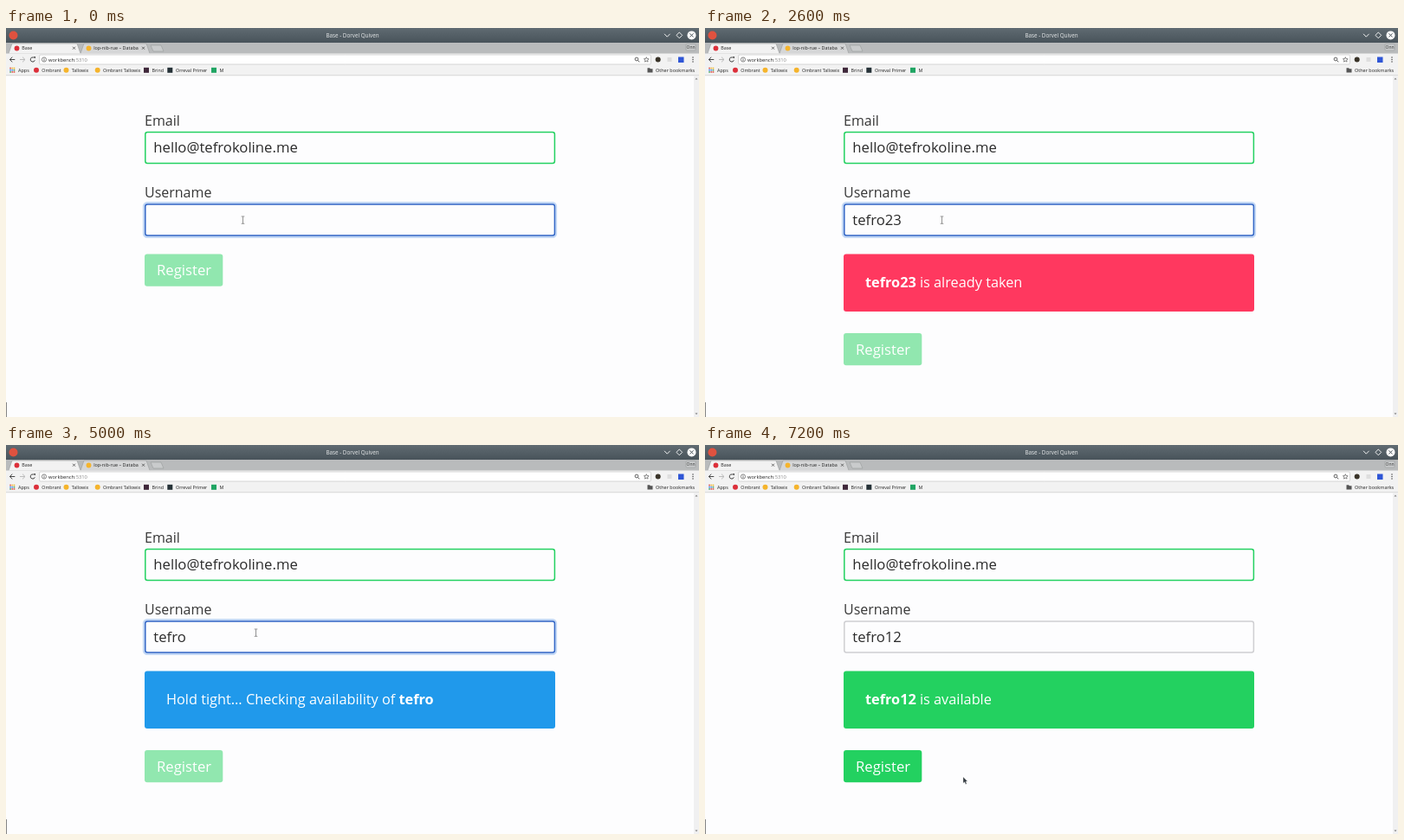
An HTML page with a canvas for the animation above (7.4 s loop, 800x450 px).

```html
<!DOCTYPE html>
<html lang="en">
<head>
<meta charset="utf-8">
<title>Registration form</title>
<style>
html, body { margin: 0; width: 100%; height: 100%; overflow: hidden; background: #fdfdfe; }
canvas { display: block; width: 800px; height: 450px; }
</style>
</head>
<body>
<canvas id="stage" width="800" height="450"></canvas>
<script>
const ctx = document.getElementById('stage').getContext('2d');
const LOOP = 7400, STEP = 200;
const SANS = '"Open Sans", "Noto Sans", sans-serif';
const GREEN = '#23d160', BLUE = '#2099eb', RED = '#ff385f';
const USER = 'tefro';

// [time, typed value]
const typing = [
  [0, ''], [800, 't'], [1000, 'te'], [1200, 'tef'], [1400, 'tefr'], [1600, USER],
  [1800, USER + '2'], [2000, USER + '23'], [4200, USER],
  [5200, USER + '1'], [5400, USER + '12']
];
const notices = [[0, ''], [800, 'checking'], [2600, 'taken'], [4200, 'checking'], [6000, 'available']];
// [time, x, y]
const pointerPath = [
  [0, 273, 222], [2900, 273, 222], [3200, 250, 306], [3500, 310, 306],
  [4000, 288, 217], [5400, 288, 217], [6000, 321, 415], [6400, 303, 388],
  [6800, 300, 389], [7200, 298, 384]
];
const BLUR_TIME = 6800;

const latest = (list, t) => list.filter(entry => entry[0] <= t).pop();

function pointerAt(t) {
  const i = pointerPath.findIndex(p => p[0] > t);
  if (i < 0) return pointerPath[pointerPath.length - 1].slice(1);
  const [t0, x0, y0] = pointerPath[i - 1], [t1, x1, y1] = pointerPath[i];
  const u = (t - t0) / (t1 - t0), k = u * u * (3 - 2 * u);
  return [x0 + (x1 - x0) * k, y0 + (y1 - y0) * k];
}

function text(str, x, y, size, color, weight = 400, align = 'left') {
  ctx.font = `${weight} ${size}px ${SANS}`;
  ctx.fillStyle = color;
  ctx.textAlign = align;
  ctx.fillText(str, x, y);
  return x + ctx.measureText(str).width;
}

function rect(x, y, w, h, color) {
  ctx.fillStyle = color;
  ctx.fillRect(x, y, w, h);
}

function rounded(x, y, w, h, r, fill, stroke, width = 1) {
  ctx.beginPath();
  ctx.roundRect(x, y, w, h, r);
  if (fill) { ctx.fillStyle = fill; ctx.fill(); }
  if (stroke) { ctx.strokeStyle = stroke; ctx.lineWidth = width; ctx.stroke(); }
}

function dot(x, y, r, color) {
  ctx.beginPath();
  ctx.arc(x, y, r, 0, Math.PI * 2);
  ctx.fillStyle = color;
  ctx.fill();
}

function ring(x, y, r, color, width, from = 0, to = Math.PI * 2) {
  ctx.beginPath();
  ctx.arc(x, y, r, from, to);
  ctx.strokeStyle = color;
  ctx.lineWidth = width;
  ctx.stroke();
}

function path(points, { fill, stroke, width = 1, close = false }) {
  ctx.beginPath();
  points.forEach(([x, y]) => ctx.lineTo(x, y));
  if (close) ctx.closePath();
  if (fill) { ctx.fillStyle = fill; ctx.fill(); }
  if (stroke) { ctx.strokeStyle = stroke; ctx.lineWidth = width; ctx.stroke(); }
}

function cross(x, y, r, color, width) {
  path([[x - r, y - r], [x + r, y + r]], { stroke: color, width });
  path([[x - r, y + r], [x + r, y - r]], { stroke: color, width });
}

function titleBar() {
  const shade = ctx.createLinearGradient(0, 0, 0, 17);
  shade.addColorStop(0, '#606b72');
  shade.addColorStop(1, '#48535a');
  rect(0, 0, 800, 17, shade);
  dot(8.5, 8.5, 5, '#e0523f');
  text('Base - Dorvel Quiven', 400, 10.6, 6.3, '#e9ebec', 400, 'center');
  path([[760, 6.8], [763.3, 10.2], [766.6, 6.8]], { stroke: '#fff', width: 0.9 });
  path([[777.3, 5], [780.7, 8.4], [777.3, 11.8], [773.9, 8.4]], { stroke: '#fff', width: 0.9, close: true });
  dot(791.5, 8.4, 5, '#fcfcfc');
  cross(791.5, 8.4, 2, '#48535a', 1);
}

function tab(x, w, fill, icon, label) {
  path([[x, 29.5], [x + 4, 18], [x + w - 4, 18], [x + w, 29.5]],
    { fill, stroke: '#999c9d', width: 0.6 });
  dot(x + 9.5, 23.5, 2.9, icon);
  ctx.save();
  ctx.beginPath();
  ctx.rect(x, 18, w - 13, 12);
  ctx.clip();
  text(label, x + 15.2, 25.2, 5.4, '#222');
  ctx.restore();
  cross(x + w - 7.5, 23.2, 1.5, '#444', 0.8);
}

function tabStrip() {
  rect(0, 17, 800, 13, '#b9bbbc');
  path([[167, 20], [179, 20], [182, 27], [170, 27]], { fill: '#c9cbcc', stroke: '#999c9d', width: 0.6, close: true });
  tab(86, 80, '#d5d6d7', '#f5b42c', 'lop-nib-rue – Database');
  tab(3, 83, '#f2f2f2', '#dc2f3a', 'Base');
  rounded(785, 18.5, 11, 7.5, 1, '#c8cacb', '#939697', 0.5);
  text('Onn', 790.5, 24.2, 5, '#333', 400, 'center');
}

function arrow(x, dir, color) {
  path([[x - 3 * dir, 36.5], [x + 3 * dir, 36.5]], { stroke: color, width: 1 });
  path([[x, 33.6], [x - 3 * dir, 36.5], [x, 39.4]], { stroke: color, width: 1 });
}

function toolbar() {
  rect(0, 29.5, 800, 25.5, '#f2f2f2');
  arrow(7.3, 1, '#444');
  arrow(19, -1, '#bbb');
  ring(30.8, 36.5, 2.6, '#444', 1, 0.3, 5.4);
  path([[31.8, 33], [34, 33], [34, 35.4]], { fill: '#444', close: true });
  rounded(38.5, 31, 706, 11, 1.5, '#fff', '#c6c6c6', 0.7);
  ring(44, 36.5, 2.6, '#555', 0.7);
  rect(43.6, 36, 0.8, 2.1, '#555');
  rect(43.6, 34.8, 0.8, 0.8, '#555');
  const portX = text('workbench', 49, 38.6, 5.8, '#222');
  text(':5310', portX, 38.6, 5.8, '#888');
  ring(728, 36, 1.9, '#555', 0.9);
  path([[729.4, 37.4], [731.3, 39.3]], { stroke: '#555', width: 1 });
  const star = Array.from({ length: 10 }, (_, i) => {
    const a = i * Math.PI / 5 - Math.PI / 2, r = i % 2 ? 1.4 : 3;
    return [739.3 + r * Math.cos(a), 36.7 + r * Math.sin(a)];
  });
  path(star, { stroke: '#555', width: 0.7, close: true });
  dot(752.7, 36.6, 3, '#393328');
  rect(763.5, 34, 5, 5, '#dedede');
  rect(776, 33.5, 6.5, 6.5, '#2f56d6');
  [34, 36.5, 39].forEach(y => dot(793, y, 0.75, '#444'));
}

function bookmarks() {
  const appColors = ['#de4f43', '#48a45d', '#4385ed', '#efb72e'];
  for (let i = 0; i < 9; i++) {
    rect(4.3 + (i % 3) * 2.2, 45.7 + Math.floor(i / 3) * 2.2, 1.6, 1.6, appColors[(i * 3 + (i >> 1)) % 4]);
  }
  text('Apps', 14, 50.8, 5.5, '#222');
  [[35, 'Ombrant', '#dc2f3a'], [69.5, 'Tallowix', '#f5b42c'], [105.7, 'Ombrant Tallowix', '#f5b42c']]
    .forEach(([x, label, color]) => {
      dot(x, 48.8, 3, color);
      text(label, x + 6.3, 50.8, 5.3, '#222');
    });
  [[159, 'Brind', '#40283b', 168.5], [186.3, 'Orreval Primer', '#263238', 196], [237, 'M', '#20a563', 246.5]]
    .forEach(([x, label, color, labelX]) => {
      rect(x, 45.8, 6, 6, color);
      text(label, labelX, 50.8, 5.3, '#222');
    });
  path([[740.5, 46.2], [743, 46.2], [744, 47.2], [746.5, 47.2], [746.5, 51.5], [740.5, 51.5]], { fill: '#555', close: true });
  text('Other bookmarks', 750, 50.8, 5.5, '#222');
  rect(0, 54.5, 800, 0.7, '#c9c9c9');
}

function pageEdges() {
  rect(794, 55.2, 6, 395, '#f0f0f1');
  path([[795.5, 59.5], [797, 57.7], [798.5, 59.5]], { fill: '#777', close: true });
  path([[795.5, 445.5], [797, 447.3], [798.5, 445.5]], { fill: '#777', close: true });
  rect(0, 433, 1, 17, '#858585');
}

function notice(kind, user) {
  const colors = { checking: BLUE, taken: RED, available: GREEN };
  rounded(160, 261.5, 474, 66.5, 3, colors[kind]);
  const size = 16.3, y = 300.3;
  if (kind === 'checking') {
    const x = text('Hold tight... Checking availability of ', 185, y, size, '#fff');
    text(user, x, y, size, '#fff', 700);
  } else {
    const x = text(user, 185, y, size, '#fff', 700);
    text(kind === 'taken' ? ' is already taken' : ' is available', x, y, size, '#fff');
  }
}

function form(t) {
  const [keyTime, user] = latest(typing, t);
  const kind = latest(notices, t)[1];
  const focused = t < BLUR_TIME;

  text('Email', 160, 112.8, 16, '#363636');
  rounded(160.8, 120.6, 472.6, 36, 2.5, '#fdfdfe', GREEN, 1.5);
  text('hello@tefrokoline.me', 170.3, 144, 16.7, '#2b2b2b');

  text('Username', 160, 196, 16, '#363636');
  if (focused) rounded(159.6, 202.6, 474.8, 38.8, 3.5, null, '#c3d8f5', 3.4);
  rounded(160.8, 203.9, 472.6, 36.2, 2.5, '#fdfdfe', focused ? '#3467c6' : '#cfcfd2', 1.5);
  const caretX = text(user, 170.3, 227.5, 16.7, '#2b2b2b');
  const caretOn = t >= 600 && (t - keyTime) % 1000 < 500;
  if (focused && caretOn) rect(Math.round(caretX), 212.5, 0.9, 18.5, '#333');

  if (kind) notice(kind, user);
  const top = kind ? 353 : 261.5;
  rounded(160, top, 90.3, 37.3, 3, kind === 'available' ? GREEN : '#91e7af');
  text('Register', 174, top + 24.6, 16.7, '#fff');
}

function pointer(t) {
  const [x, y] = pointerAt(t);
  const overField = y > 203 && y < 241, overNotice = y > 261 && y < 328;
  if (overField || overNotice) {
    const stroke = '#777', width = 0.8;
    path([[x + 0.5, y - 3.7], [x + 0.5, y + 4]], { stroke, width });
    [-4, 4.3].forEach(d => path([[x - 1.3, y + d], [x + 2.3, y + d]], { stroke, width }));
    return;
  }
  const shape = [[0, 0], [0, 7.2], [1.7, 5.8], [2.9, 8.4], [4.1, 7.8], [3, 5.3], [5, 5.1]];
  path(shape.map(([dx, dy]) => [x + dx, y + dy]), { fill: '#333a40', stroke: '#dcdcdc', width: 0.4, close: true });
}

function draw(now) {
  const t = Math.floor((now % LOOP) / STEP) * STEP;
  rect(0, 0, 800, 450, '#fdfdfe');
  titleBar();
  tabStrip();
  toolbar();
  bookmarks();
  pageEdges();
  form(t);
  pointer(t);
}

let start;
function tick(now) {
  start ??= now;
  draw(now - start);
  requestAnimationFrame(tick);
}
draw(0);
requestAnimationFrame(tick);
</script>
</body>
</html>
```
